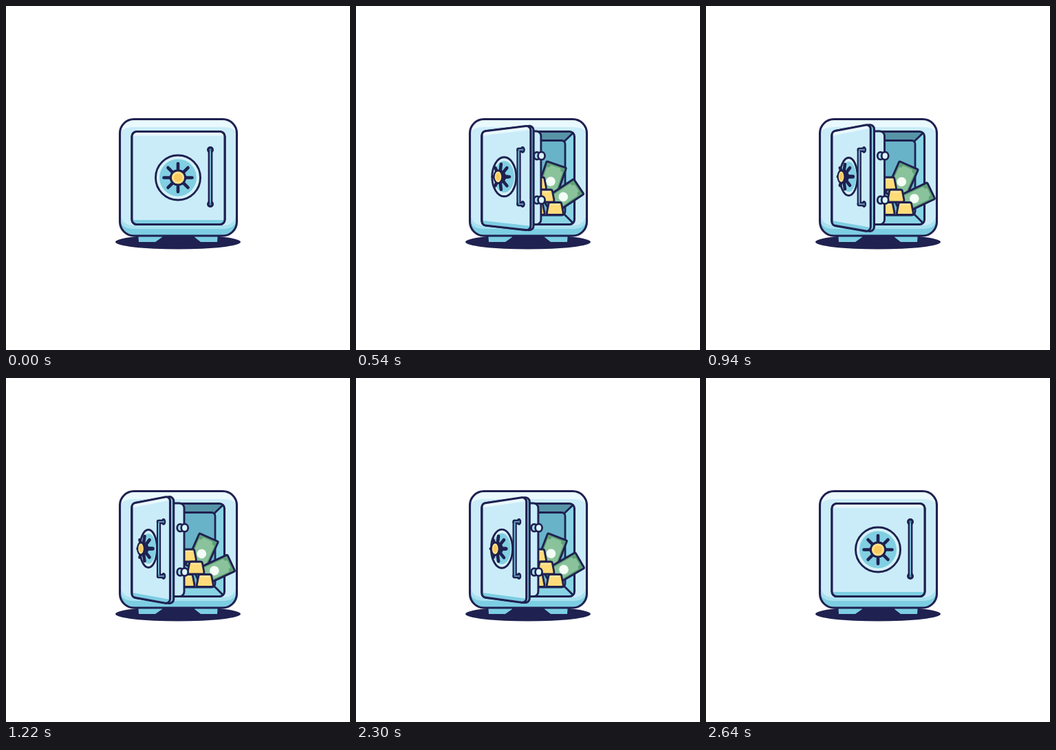
These frames come from a looping animation (500 px wide and 500 px high, 3020 ms). An HTML page with a canvas:

```html
<!DOCTYPE html>
<html lang="en">
<head>
<meta charset="utf-8">
<title>Safe</title>
<style>
  html, body { margin: 0; width: 100%; height: 100%; overflow: hidden; background: #fff; }
  canvas { display: block; width: 500px; height: 500px; }
</style>
</head>
<body>
<canvas id="stage"></canvas>
<script>
const LOOP = 3020, STEP = 20;
const NAVY = '#1f2150', PALE = '#caecf9', SHINE = '#e9f9fe', TEAL = '#7dcee2';
const canvas = document.getElementById('stage');
const ctx = canvas.getContext('2d');
const ratio = window.devicePixelRatio || 1;
canvas.width = canvas.height = 500 * ratio;

// Cubic bezier easing, solved by bisection
function bezier(x1, y1, x2, y2) {
  const at = (s, a, b) => 3 * (1 - s) * (1 - s) * s * a + 3 * (1 - s) * s * s * b + s ** 3;
  return x => {
    let lo = 0, hi = 1;
    for (let i = 0; i < 24; i++) {
      const mid = (lo + hi) / 2;
      if (at(mid, x1, x2) < x) lo = mid; else hi = mid;
    }
    return at((lo + hi) / 2, y1, y2);
  };
}
const openEase = bezier(0.45, 0, 0.1, 1);

function openness(t) {
  if (t < 1100) return t ? openEase(t / 1100) : 0;
  if (t < 2120) return 1;
  return 1 - Math.min(1, (t - 2120) / 460) ** 2.3;
}

function hop(t) {
  return t > 2540 && t < 2640 ? -3 * Math.sin(Math.PI * (t - 2540) / 100) : 0;
}

function paint(fill, stroke, width = 3.1) {
  if (fill) { ctx.fillStyle = fill; ctx.fill(); }
  if (stroke) { ctx.strokeStyle = stroke; ctx.lineWidth = width; ctx.stroke(); }
}

function poly(points, radius = 0) {
  ctx.beginPath();
  const n = points.length, [ax, ay] = points[0], [bx, by] = points[n - 1];
  ctx.moveTo((ax + bx) / 2, (ay + by) / 2);
  points.forEach(([x, y], i) => ctx.arcTo(x, y, ...points[(i + 1) % n], radius));
  ctx.closePath();
}

function box(x, y, w, h, r) {
  poly([[x, y], [x + w, y], [x + w, y + h], [x, y + h]], r);
}

function oval(x, y, rx, ry = rx) {
  ctx.beginPath();
  ctx.ellipse(x, y, rx, ry, 0, 0, Math.PI * 2);
}

function line(x1, y1, x2, y2, color, width) {
  ctx.beginPath();
  ctx.moveTo(x1, y1);
  ctx.lineTo(x2, y2);
  paint(null, color, width);
}

function clipped(draw) {
  ctx.save();
  ctx.clip();
  draw();
  ctx.restore();
}

function ground() {
  oval(250, 343, 91, 10.5);
  paint(NAVY);
  poly([[192, 330], [227, 330], [227, 336], [217, 343], [193, 343]]);
  paint(TEAL);
  poly([[274, 330], [308, 330], [307, 343], [283, 343], [274, 336]]);
  paint(TEAL);
}

// Band across the body from a curved edge out to the far side
function band(side, middle, edge, color) {
  ctx.beginPath();
  ctx.moveTo(165, side);
  ctx.quadraticCurveTo(167, middle, 186, middle);
  ctx.lineTo(315, middle);
  ctx.quadraticCurveTo(334, middle, 336, side);
  ctx.lineTo(336, edge);
  ctx.lineTo(165, edge);
  paint(color);
}

function body() {
  const shape = () => box(165.5, 164.5, 170, 169.5, 20.5);
  shape();
  paint(PALE);
  clipped(() => {
    band(188, 176, 160, SHINE);
    band(298, 319, 336, '#a9e1ef');
    band(309, 324, 336, TEAL);
  });
  shape();
  paint(null, NAVY);
}

function interior() {
  const shape = () => box(183, 182.5, 134.5, 135, 7);
  shape();
  clipped(() => {
    ctx.fillStyle = '#88d4e5';
    ctx.fillRect(180, 180, 140, 140);
    poly([[180, 180], [320, 180], [304, 196], [180, 196]]);
    paint('#5794a8');
    box(150, 195.5, 154, 108.5, 5);
    paint('#69b3c9', NAVY, 2.8);
    line(302.5, 197, 317, 183, NAVY, 2.8);
    line(302.5, 302.5, 317, 317, NAVY, 2.8);
  });
  shape();
  paint(null, NAVY);
}

function bill(x, y, degrees, length, half, spot) {
  ctx.save();
  ctx.translate(x, y);
  ctx.rotate(degrees * Math.PI / 180);
  box(-6, -half, length + 6, half * 2, 1.5);
  paint('#5f9f78');
  const e = half - 3, far = length - 3.5;
  poly([[-3, -e], [far - 4, -e], [far - 4, -e + 4], [far, -e + 4],
        [far, e - 4], [far - 4, e - 4], [far - 4, e], [-3, e]], 1.8);
  paint('#8ac39b');
  oval(spot, 0, 6.8);
  paint('#f3fcf5');
  box(-6, -half, length + 6, half * 2, 1.5);
  paint(null, NAVY, 2.9);
  ctx.restore();
}

function gold(x, y) {
  const shape = () => poly([[x - 9, y], [x + 9, y], [x + 12.5, y + 18], [x - 12.5, y + 18]], 2.5);
  shape();
  paint('#ffdc79');
  line(x - 7, y + 3, x + 6, y + 3, '#ffe9a6', 2);
  shape();
  paint(null, NAVY, 2.8);
}

function treasure(p) {
  bill(277, 272, -91 + 25 * p, 44, 15, 18);
  bill(283.8, 289, -70 + 45 * p, 48, 13.2, 21);
  gold(264.5, 249);
  gold(276, 267);
  gold(262, 285.5);
  gold(289.3, 285.5);
}

function bolt(x, y) {
  oval(x - 11.5, y, 4.5, 5.4);
  paint('#a9deee', NAVY, 2.8);
  oval(x - 5, y, 5, 5.6);
  paint('#dcf5fc', NAVY, 2.8);
}

function backPlate(p) {
  const right = 310 - 51 * p;
  box(190, 182, right - 190, 135.5, 7);
  paint(PALE, NAVY, 2.9);
  bolt(right + 5.7, 217.8);
  bolt(right + 5.7, 282);
}

function panel(p, dx) {
  const right = 318 - 79.5 * p + dx, lift = 11 * p;
  poly([[183, 182.5], [right, 182.5 - lift], [right, 317.5 + lift], [183, 317.5 + p]], 7 - p);
}

function doorFace(p) {
  const right = 318 - 79.5 * p, lift = 11 * p;
  panel(p, 5.2 * p);
  paint('#8ccfe3', NAVY);
  panel(p, 0);
  paint(PALE);
  clipped(() => {
    line(183, 186, right, 186 - lift, SHINE, 5);
    line(183, 313.5 + p, right, 313.5 + lift, TEAL, 5);
  });
  panel(p, 0);
  paint(null, NAVY);
}

function dial(p) {
  const y = 249.5 - 1.5 * p, x = 250 - 43 * p;
  const rx = 33 - 16 * p - 4 * p ** 3, ry = 33 - 5 * p, k = rx / 33;
  oval(x, y, rx - 0.5, ry - 0.5);
  paint('#d5f1fa', NAVY, 2.9);
  oval(x, y, rx - 6 * k, ry - 6);
  paint('#81cfe2');

  // Axle from the door to the wheel, then the spokes and the raised hub
  const wx = 250 - 48.5 * p, hx = 250 - 54 * p;
  const sx = 20.5 - 10.5 * p, sy = 20.5 - 2.5 * p;
  line(wx, y, 250 - 37 * p, y, NAVY, 5.5);
  for (let i = 0; i < 8; i++) {
    const a = i * Math.PI / 4;
    line(hx + (wx - hx) * 0.5, y, wx + sx * Math.cos(a), y + sy * Math.sin(a), NAVY, 4.6);
  }
  const hr = 11.7 - 5.7 * p, hy = 11.7 - 1.5 * p;
  for (let i = 0; i <= 8; i++) {
    oval(hx + (wx - hx) * i / 8, y, hr, hy - i * p * 0.2);
    paint(NAVY);
  }
  oval(hx, y, hr - 2.6 + 0.4 * p, hy - 2.6);
  paint('#ffe18a');
  oval(hx, y, (hr - 2.6) * 0.67, (hy - 2.6) * 0.67);
  paint('#f8c95d');
}

function handle(p) {
  const bar = 297 - 75 * p, base = 297 - 68 * p;
  const ends = [209, 288];
  for (const y of ends) {
    line(bar, y, base, y, NAVY, 6.4);
    oval(base, y, 5 - 1.8 * p, 5);
    paint(NAVY);
  }
  line(bar, ends[0], bar, ends[1], NAVY, 6.8 - 0.6 * p);
  line(bar, ends[0] + 2, bar, ends[1] - 2, '#79bdd8', 1.9);
  for (const y of ends) {
    line(bar, y, base, y, '#79bdd8', 1.7);
    oval(base, y, 1.7 - 0.5 * p, 1.8);
    paint('#548fae');
  }
}

function draw(t) {
  const p = openness(t);
  ctx.setTransform(ratio, 0, 0, ratio, 0, 0);
  ctx.lineCap = ctx.lineJoin = 'round';
  ctx.fillStyle = '#fff';
  ctx.fillRect(0, 0, 500, 500);
  ground();
  ctx.translate(0, hop(t));
  body();
  if (p > 0) {
    interior();
    treasure(p);
    backPlate(p);
  }
  doorFace(p);
  dial(p);
  handle(p);
}

const start = performance.now();
function tick() {
  const t = (performance.now() - start) % LOOP;
  draw(Math.floor(t / STEP) * STEP);
  requestAnimationFrame(tick);
}
tick();
</script>
</body>
</html>
```
